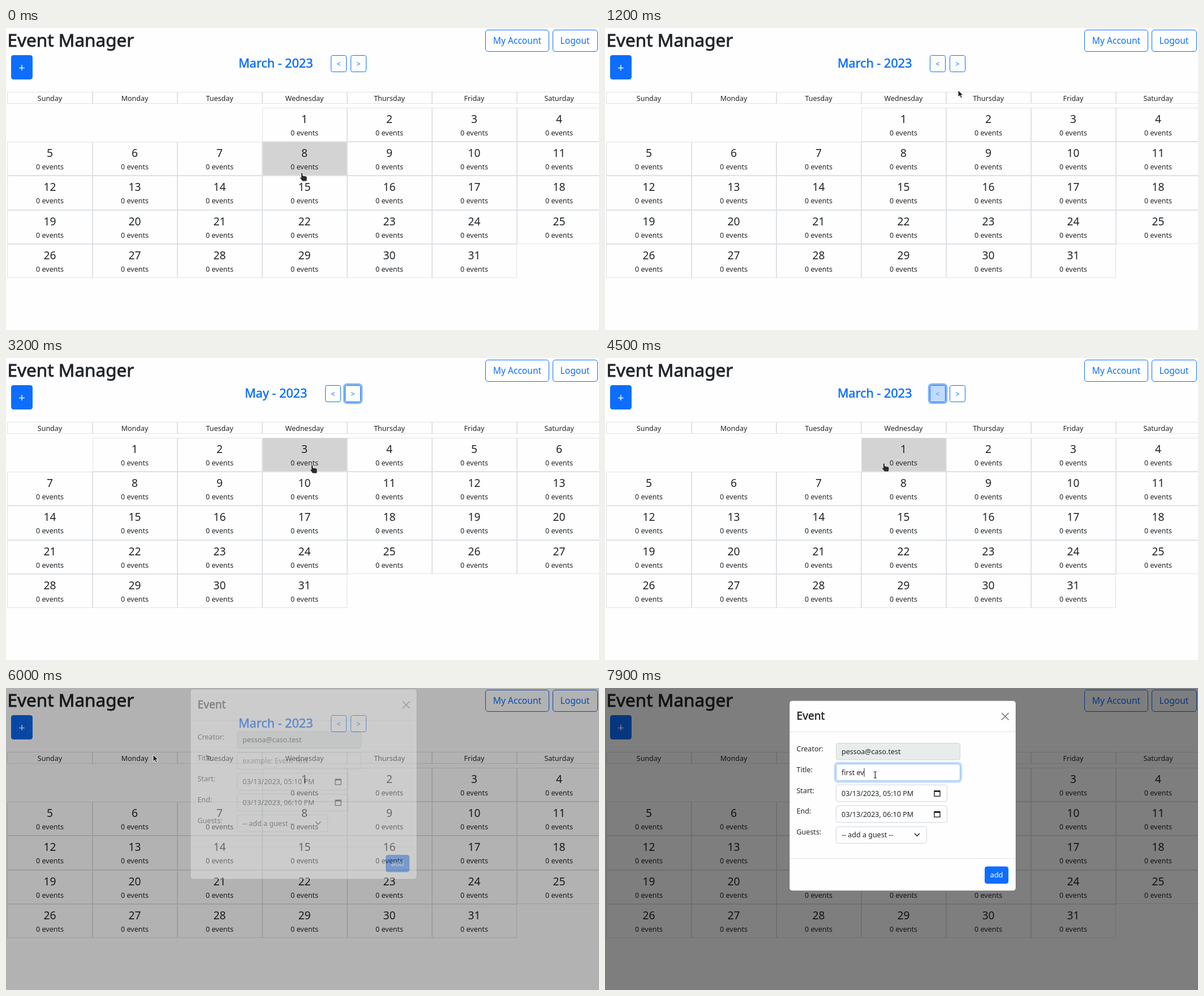
Recreate the animation shown at these times as an HTML page. Size 1048 by 534 pixels, loop 8000 ms.

```html
<!DOCTYPE html>
<html lang="en">
<head>
<meta charset="utf-8">
<title>Event Manager</title>
<style>
  html, body { margin: 0; width: 100%; height: 100%; overflow: hidden; background: #fefefe; }
  svg { display: block; width: 1048px; height: 534px; }
  text { font-family: "Noto Sans", "Open Sans", sans-serif; white-space: pre; }
</style>
</head>
<body>
<svg id="stage" viewBox="0 0 1048 534" xmlns="http://www.w3.org/2000/svg"></svg>
<script>
const STEP = 100, LOOP = 8000;
const BLUE = '#0d6efd', INK = '#212529', LINE = '#dee2e6', PAPER = '#fefefe';
const DAYS = ['Sunday', 'Monday', 'Tuesday', 'Wednesday', 'Thursday', 'Friday', 'Saturday'];
const ROWS = [141, 201, 261, 322, 382, 442, 503];
const MONTHS = {
  March: { first: 3, days: 31, title: 412, nav: 574 },
  April: { first: 6, days: 30, title: 420, nav: 566 },
  May: { first: 1, days: 31, title: 423, nav: 564 }
};
const TYPED = 'first ev', TYPE_START = 72;

// Pointer: step, x, y, shape (h hand, a arrow, i text beam)
const POINTER = [
  [0, 523, 256, 'h'], [1, 445, 290, 'h'], [2, 400, 340, 'h'], [4, 743, 300, 'h'],
  [6, 730, 240, 'h'], [7, 580, 225, 'h'], [8, 410, 250, 'h'], [9, 470, 280, 'h'],
  [11, 588, 175, 'h'], [12, 624, 110, 'a'], [13, 623, 88, 'a'], [14, 621, 66, 'h'],
  [28, 618, 82, 'a'], [29, 605, 108, 'a'], [30, 586, 142, 'h'], [31, 560, 170, 'h'],
  [32, 541, 189, 'h'], [33, 541, 184, 'h'], [34, 556, 120, 'a'], [35, 576, 72, 'h'],
  [36, 579, 66, 'h'], [44, 548, 110, 'a'], [45, 493, 186, 'h'], [46, 435, 214, 'h'],
  [47, 365, 238, 'h'], [48, 292, 255, 'h'], [49, 250, 280, 'h'], [50, 236, 310, 'h'],
  [51, 228, 335, 'h'], [53, 196, 290, 'h'], [54, 145, 225, 'h'], [55, 88, 150, 'a'],
  [56, 52, 101, 'a'], [57, 42, 82, 'h'], [59, 44, 84, 'a'], [60, 260, 118, 'a'],
  [61, 505, 170, 'a'], [62, 492, 160, 'i'], [63, 481, 155, 'i'], [64, 477.5, 153.5, 'i']
];

// Changes of the interface, merged in order; fill and ring run from 0 to 1
const CHANGES = [
  [0, { month: 'March', prev: 0, prevRing: 0, next: 0, nextRing: 0, plus: 0, plusRing: 0,
        shade: 0, modal: 0, top: 22.5, focus: 0, caret: 0 }],
  [14, { next: .6 }], [15, { next: 1 }], [16, { month: 'April', nextRing: .7 }], [17, { nextRing: 1 }],
  [26, { month: 'May' }], [28, { next: .7 }], [29, { next: 0 }],
  [35, { prev: .4 }], [36, { prev: 1 }], [37, { month: 'April', prevRing: .7, nextRing: 0 }],
  [38, { prevRing: 1 }], [42, { month: 'March' }], [44, { prev: .8 }], [45, { prev: .25 }], [46, { prev: 0 }],
  [57, { plus: .7 }], [58, { plus: 1, prevRing: 0 }], [59, { plusRing: .4 }],
  [60, { plus: .5, plusRing: 0, shade: .3, modal: .35, top: 2 }],
  [61, { plus: 0, shade: .5, modal: 1, top: 18 }], [62, { top: 21.5 }], [63, { top: 22.5 }],
  [66, { focus: .5 }], [67, { focus: 1 }], [68, { caret: 1 }]
];

const SHAPES = {
  a: '<path d="M0 0V12L3 9.4 5 14 7.2 13 5.2 8.7H9Z" fill="#222" stroke="#fff" stroke-width=".9"/>',
  h: '<path d="M-1.6 1.6Q-1.6 0 0 0T1.6 1.6V5L7 6Q9 6.4 9 8V11Q9 13 8 15H1L-3.4 9.5Q-3.8 8-2.4 8L-1.6 8.6Z" fill="#2b2b2b" stroke="#fff" stroke-width=".8"/>',
  i: '<path d="M-2.5-5.5H-.7L0-4.8.7-5.5H2.5M0-4.8V4.8M-2.5 5.5H-.7L0 4.8.7 5.5H2.5" fill="none" stroke="#222" stroke-width="1.2"/>'
};

const stage = document.getElementById('stage');
const ruler = document.createElement('canvas').getContext('2d');
ruler.font = '12.5px "Noto Sans", "Open Sans", sans-serif';

const escape = s => String(s).replace(/</g, '&lt;').replace(/>/g, '&gt;');
const text = (x, y, size, s, fill = INK, more = '') =>
  `<text x="${x}" y="${y}" font-size="${size}" fill="${fill}" ${more}>${escape(s)}</text>`;
const mid = (x, y, size, s, fill) => text(x, y, size, s, fill, 'text-anchor="middle"');
const medium = (x, y, size, s, fill = INK) =>
  text(x, y, size, s, fill, `stroke="${fill}" stroke-width="${size * .026}"`);
const box = (x, y, w, h, r, fill, stroke = 'none', more = '') =>
  `<rect x="${x + .5}" y="${y + .5}" width="${w - 1}" height="${h - 1}" rx="${r}" fill="${fill}" stroke="${stroke}" ${more}/>`;
const rule = (x1, x2, y) => `<path d="M${x1} ${y}H${x2}" stroke="${LINE}"/>`;
const mix = (a, b, k) => `rgb(${a.map((v, i) => Math.round(v + (b[i] - v) * k))})`;
const ring = (x, y, w, h, alpha) => alpha
  ? `<rect x="${x - 1.6}" y="${y - 1.6}" width="${w + 3.2}" height="${h + 3.2}" rx="5.2" fill="none" stroke="${BLUE}" stroke-opacity="${alpha}" stroke-width="3.2"/>` : '';

function cellAt(x, y) {
  const col = Math.floor((x - 3) / 150);
  const row = ROWS.findIndex((top, i) => y >= top && y < ROWS[i + 1]);
  return row < 0 ? -1 : row * 7 + col;
}

function cell(col, top, bottom, fill) {
  const x = col ? 3 + col * 150 : 2;
  return box(x, top, 153 + col * 150 - x, bottom - top, 0, fill, LINE);
}

function calendar(month, hovered) {
  const { first, days } = MONTHS[month];
  let out = DAYS.map((d, i) => cell(i, 113, 134, PAPER) + mid(77.5 + i * 150, 128.5, 12.5, d)).join('');
  for (let n = 1; n <= days; n++) {
    const slot = first + n - 1, col = slot % 7, row = Math.floor(slot / 7);
    const x = 77.5 + col * 150, y = ROWS[row];
    out += cell(col, y, ROWS[row + 1], slot === hovered ? '#d3d3d3' : PAPER)
      + mid(x, y + 26.5, 19.2, n) + mid(x, y + 48.5, 12.5, '0 events');
  }
  return out;
}

function navButton(x, sign, fill, focus) {
  return ring(x, 48, 28, 30, focus * .5)
    + box(x, 48, 28, 30, 3, BLUE, BLUE, `fill-opacity="${fill}"`)
    + mid(x + 14, 67.5, 13, sign, mix([13, 110, 253], [255, 255, 255], fill));
}

function page(s, hovered) {
  const { title, nav } = MONTHS[s.month];
  return `<rect width="1048" height="534" fill="${PAPER}"/>`
    + medium(2.5, 33, 31.5, 'Event Manager')
    + box(847, 3, 113, 39, 4.5, 'none', BLUE) + mid(903.5, 28, 15.6, 'My Account', BLUE)
    + box(966, 3, 80, 39, 4.5, 'none', BLUE) + mid(1005.5, 28, 15.6, 'Logout', BLUE)
    + ring(9, 48, 38, 43, s.plusRing * .5)
    + box(9, 48, 38, 43, 4, mix([13, 110, 253], [11, 94, 215], s.plus))
    + box(8.5, 47.5, 39, 44, 4.5, mix([13, 110, 253], [11, 94, 215], s.plus))
    + mid(28, 76.5, 20, '+', '#fff')
    + medium(title - 1, 70, 21.6, s.month + ' - 2023', BLUE)
    + navButton(nav, '<', s.prev, s.prevRing) + navButton(nav + 35, '>', s.next, s.nextRing)
    + calendar(s.month, hovered);
}

// Coordinates inside the dialog are relative to its top left corner
function dialog(s, typed) {
  const rowY = i => 74.5 + i * 36.9;
  const field = (i, w, value, fill = PAPER, color = INK, stroke = '#ced4da') =>
    box(82, rowY(i), w, 30.5, 4, fill, stroke) + text(92, rowY(i) + 19.8, 12.5, value, color);
  const date = (i, value) => field(i, 197, value)
    + `<path transform="translate(256 ${rowY(i) + 10})" d="M0 1H10V10.5H0ZM0 2.3H10M2 0V2M8 0V2" fill="none" stroke="#111" stroke-width="1.3"/>`;
  const labels = ['Creator:', 'Title:', 'Start:', 'End:', 'Guests:'];
  const caretX = 92.5 + ruler.measureText(typed).width;
  return `<g transform="translate(326 ${s.top})" opacity="${s.modal}">`
    + box(-.5, -.5, 401, 337, 4.8, PAPER, '#000', 'stroke-opacity=".2"')
    + medium(12.5, 33.5, 19.2, 'Event')
    + '<path d="M375.5 22L387 33.5M387 22L375.5 33.5" stroke="#777" stroke-width="1.7" stroke-linecap="round"/>'
    + rule(0, 400, 55) + rule(0, 400, 279)
    + labels.map((l, i) => text(12.5, 89.2 + i * 36.9, 12.5, l)).join('')
    + field(0, 220, 'pessoa@caso.test', '#e8eceb')
    + ring(82, rowY(1), 220, 30.5, s.focus * .25)
    + field(1, 220, typed || 'example: Event Test', PAPER, typed ? INK : '#6c757d',
        mix([206, 212, 218], [134, 183, 254], s.focus))
    + (s.caret ? `<path d="M${caretX} ${rowY(1) + 8}v15" stroke="${INK}"/>` : '')
    + date(2, '03/13/2023, 05:10 PM') + date(3, '03/13/2023, 06:10 PM')
    + field(4, 161, '-- add a guest --')
    + `<path d="M221.5 ${rowY(4) + 13}l4 4 4-4" fill="none" stroke="#343a40" stroke-width="1.6" stroke-linecap="round" stroke-linejoin="round"/>`
    + box(345, 293, 42, 30.5, 3.5, BLUE, BLUE) + mid(366, 312.8, 12.8, 'add', '#fff')
    + '</g>';
}

function render(step) {
  const s = Object.assign({}, ...CHANGES.filter(c => c[0] <= step).map(c => c[1]));
  const [, x, y, shape] = POINTER.filter(p => p[0] <= step).pop();
  const typed = TYPED.slice(0, Math.max(0, step - TYPE_START + 1));
  const hovered = s.modal ? -1 : cellAt(x, y);
  stage.innerHTML = page(s, hovered)
    + (s.shade ? `<rect width="1048" height="534" opacity="${s.shade}"/>` : '')
    + (s.modal ? dialog(s, typed) : '')
    + `<g transform="translate(${x} ${y})">${SHAPES[shape]}</g>`;
}

const began = performance.now();
let shown = -1;
function tick() {
  const step = Math.floor((performance.now() - began) % LOOP / STEP);
  if (step !== shown) render(shown = step);
  requestAnimationFrame(tick);
}
tick();
</script>
</body>
</html>
```
